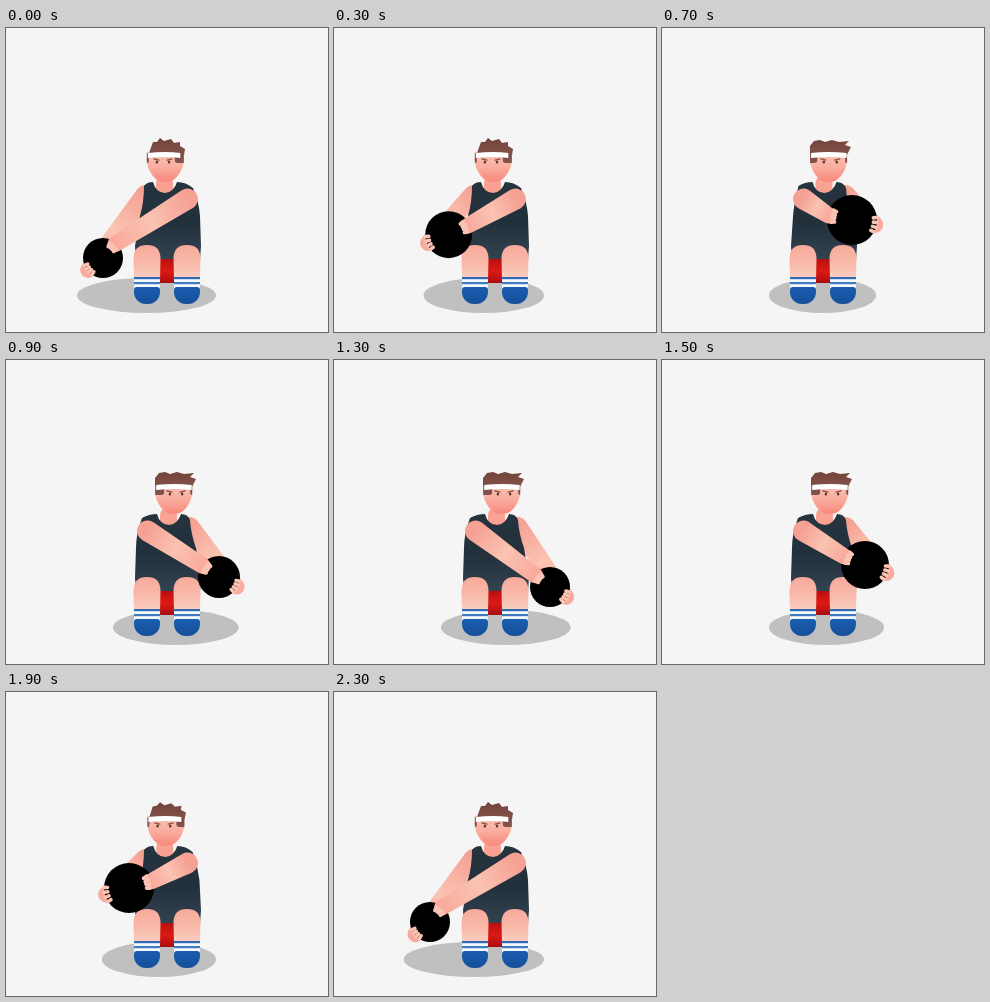
Recreate the animation shown at these times as an HTML page with a canvas. Size 322 px wide and 304 px high, loop 2400 ms.

```html
<!DOCTYPE html>
<html lang="en">
<head>
<meta charset="utf-8">
<title>Seated ball twist</title>
<style>
  html, body { margin: 0; width: 100%; height: 100%; overflow: hidden; background: #f5f5f5; }
  canvas { display: block; width: 322px; height: 304px; }
</style>
</head>
<body>
<canvas id="stage"></canvas>
<script>
const LOOP = 2400, STEP = 100, MID = 160;
const canvas = document.getElementById('stage');
const dpr = window.devicePixelRatio || 1;
canvas.width = 322 * dpr;
canvas.height = 304 * dpr;
const c = canvas.getContext('2d');
c.scale(dpr, dpr);

// Ball path: [time, x, y, radius]
const path = [
  [0, 97, 230, 20], [200, 103, 219, 22], [500, 146, 183, 26], [700, 190, 192, 25],
  [900, 213, 217, 21], [1100, 223, 231, 20], [1300, 216, 227, 20], [1500, 203, 205, 24],
  [1700, 171, 182, 26], [1900, 123, 196, 25], [2100, 101, 221, 21.5], [2300, 96, 230, 20]
];

const HAIR_SIDE = [[143, 125], [147, 114], [151, 114], [154, 110], [158, 113], [165, 111], [168, 115], [174, 114], [174, 118], [179, 121], [178, 127]];
const HAIR_FRONT = [[145, 126], [145, 118], [149, 113], [155, 112], [160, 114], [167, 112], [174, 114], [184, 113], [180, 117], [186, 119], [182, 127]];

const mix = (a, b, k) => a + (b - a) * k;
const clamp = (v, lo, hi) => Math.max(lo, Math.min(hi, v));

// Smooth cyclic interpolation with slopes taken from the neighbouring keys
function ballAt(t) {
  const n = path.length;
  const key = i => {
    const turn = Math.floor(i / n), p = path[i - turn * n];
    return [p[0] + turn * LOOP, p[1], p[2], p[3]];
  };
  let i = n - 1;
  while (path[i][0] > t) i--;
  const [a, b, d, e] = [key(i - 1), key(i), key(i + 1), key(i + 2)];
  const span = d[0] - b[0], k = (t - b[0]) / span;
  const k2 = k * k, k3 = k2 * k;
  return [1, 2, 3].map(j => {
    const m0 = (d[j] - a[j]) / (d[0] - a[0]) * span;
    const m1 = (e[j] - b[j]) / (e[0] - b[0]) * span;
    return (2 * k3 - 3 * k2 + 1) * b[j] + (k3 - 2 * k2 + k) * m0 +
           (3 * k2 - 2 * k3) * d[j] + (k3 - k2) * m1;
  });
}

function gradient(x0, y0, x1, y1, ...colors) {
  const g = c.createLinearGradient(x0, y0, x1, y1);
  colors.forEach((col, i) => g.addColorStop(i / (colors.length - 1), col));
  return g;
}

function ellipse(x, y, rx, ry, fill) {
  c.beginPath();
  c.ellipse(x, y, rx, ry, 0, 0, 7);
  c.fillStyle = fill;
  c.fill();
}

function shape(d, fill) {
  c.fillStyle = fill;
  c.fill(new Path2D(d));
}

function box(x, y, w, h, radii, fill) {
  c.beginPath();
  c.roundRect(x, y, w, h, radii);
  c.fillStyle = fill;
  c.fill();
}

function line(x0, y0, x1, y1, width, color) {
  c.beginPath();
  c.moveTo(x0, y0);
  c.lineTo(x1, y1);
  c.lineWidth = width;
  c.lineCap = 'round';
  c.strokeStyle = color;
  c.stroke();
}

// Tapered arm between two round ends
function arm(x0, y0, r0, x1, y1, r1) {
  const a = Math.atan2(y1 - y0, x1 - x0);
  const lean = Math.acos(clamp((r0 - r1) / Math.hypot(x1 - x0, y1 - y0), -1, 1));
  c.beginPath();
  c.arc(x0, y0, r0, a + lean, a - lean + 2 * Math.PI);
  c.arc(x1, y1, r1, a - lean, a + lean);
  c.closePath();
  c.fillStyle = gradient(x0, y0, x1, y1, '#f5a295', '#fac3b2', '#f9aa9c');
  c.fill();
}

function fingers(x, y, r, angle) {
  for (let i = -1.5; i < 2; i++) {
    const a = angle + i * 0.2, dx = Math.cos(a), dy = Math.sin(a);
    line(x + dx * r, y + dy * r, x + dx * (r - 3.5), y + dy * (r - 3.5), 3.6, '#fac4b5');
  }
}

function shadow(x) {
  const d = (x - MID) / 63;
  const left = 107 - 36 * Math.pow(Math.max(-d, 0), 2.2);
  const right = 210 + 38 * Math.pow(Math.max(d, 0), 3);
  ellipse((left + right) / 2, 267.5, (right - left) / 2, 17.5, '#c0c0c0');
}

function torso(u) {
  const l = Math.max(u, 0), r = Math.max(-u, 0);
  box(152 + 2 * u, 148, 17, 22, 7, '#f9a193');
  shape(`M${138 - l * 2} 158 Q${142 + u} 154 ${149 + u * 2} 154
    Q${152 + u * 2} 165 ${161 + u * 2} 165 Q${170 + u * 2} 164 ${173 + u * 2} 154
    Q${181 + u} 154 ${184 + r * 3} 160 Q${185 + r * 8} 174 ${190 + r * 4} 188
    L195 218 L194 232 L130 232 L129 218 L${134 - l * 4} 188
    Q${138 - l * 8} 174 ${138 - l * 2} 158Z`, gradient(0, 154, 0, 232, '#26343f', '#22303b', '#334350'));
}

function leg(x) {
  shape(`M${x} 253 L${x - 0.5} 230 Q${x} 217 ${x + 13} 217 Q${x + 26} 217 ${x + 26.5} 230 L${x + 26} 253Z`,
    gradient(0, 217, 0, 252, '#f7a99b', '#f9b9a9', '#fbd0c2'));
  box(x, 249, 26, 13, 0, '#f4f7fb');
  box(x, 249, 26, 2.2, 0, '#2e6db5');
  box(x, 254, 26, 2.2, 0, '#3f7cc0');
  box(x, 259, 26, 17, [3, 3, 12, 12], gradient(0, 259, 0, 276, '#1a5db0', '#164f9b'));
}

function head(u) {
  const x = 163.5 + 4.2 * u, eye = 163.5 + 6.5 * u, side = Math.abs(u);
  shape(`M${x - 18} 124 L${x + 18} 124 Q${x + 20} 136 ${x + 15} 144
    Q${x + 10} 154 ${x} 154 Q${x - 10} 154 ${x - 15} 144 Q${x - 20} 136 ${x - 18} 124Z`,
    gradient(0, 124, 0, 155, '#f8c2b2', '#f9ad9e', '#fa8379'));

  const k = Math.max(-u, 0), shift = 4 * Math.max(u, 0);
  const pts = HAIR_SIDE.map((p, i) =>
    [mix(HAIR_FRONT[i][0], p[0], k) + shift, mix(HAIR_FRONT[i][1], p[1], k)]);
  shape('M' + pts.map(p => p.join(' ')).join('L') + 'Z', gradient(0, 110, 0, 127, '#714239', '#83534a'));

  // Sideburns: the one on the turned-away side widens
  const lw = 2 + 7 * Math.max(u, 0), rw = 2 + 7 * k;
  box(x - 18.5, 125, lw, 10, [0, 0, 3, 0], '#80504a');
  box(x + 18.5 - rw, 125, rw, 10, [0, 0, 0, 3], '#80504a');

  const bl = x - 17.5, br = x + 18 - 3 * k;
  shape(`M${bl} 125 Q${x} 123 ${br} 125 L${br} 130 Q${x} 128 ${bl} 130Z`, '#ffffff');

  const gap = 7.5 - 1.4 * side;
  for (const s of [-1, 1]) {
    const ex = eye + s * gap;
    line(ex + s * 3, 130.8, ex - s * 2, 132.2, 1.3, '#8a5048');
    ellipse(ex, 134, 1.3, 1.5, '#5d3a38');
  }
}

function draw(t) {
  const [x, y, r] = ballAt(t);
  const u = clamp((x - 159) / 42, -1, 1);
  const dir = x < 159 ? -1 : 1;
  const reach = Math.min(1.05, Math.pow((x - MID) / 63, 2));
  const grip = r * 0.95;

  // Angles of the two hands around the ball
  const out = 0.62 * reach + 0.06, near = 0.85 * reach;
  const farAngle = dir > 0 ? out : Math.PI - out;
  const nearAngle = dir > 0 ? Math.PI + near : -near;
  const farX = x + Math.cos(farAngle) * grip, farY = y + Math.sin(farAngle) * grip;
  const nearX = x + Math.cos(nearAngle) * grip, nearY = y + Math.sin(nearAngle) * grip;

  c.fillStyle = '#f5f5f5';
  c.fillRect(0, 0, 322, 304);
  shadow(x);
  arm(161.5 + dir * 22, 167, 10, farX, farY, 8);
  torso(u);
  box(153, 231, 17, 24, 0, gradient(0, 231, 0, 255, '#b90f12', '#dc1a16', '#a90e10'));
  leg(128);
  leg(168);
  head(u);
  ellipse(x, y, r, r, '#000');
  fingers(x, y, r, farAngle);
  arm(161.5 - dir * 20, 171, 10.5, nearX, nearY, 8);
  fingers(x, y, r - 4, nearAngle);
}

function tick() {
  const t = performance.now() % LOOP;
  draw(Math.floor(t / STEP) * STEP);
  requestAnimationFrame(tick);
}
tick();
</script>
</body>
</html>
```
